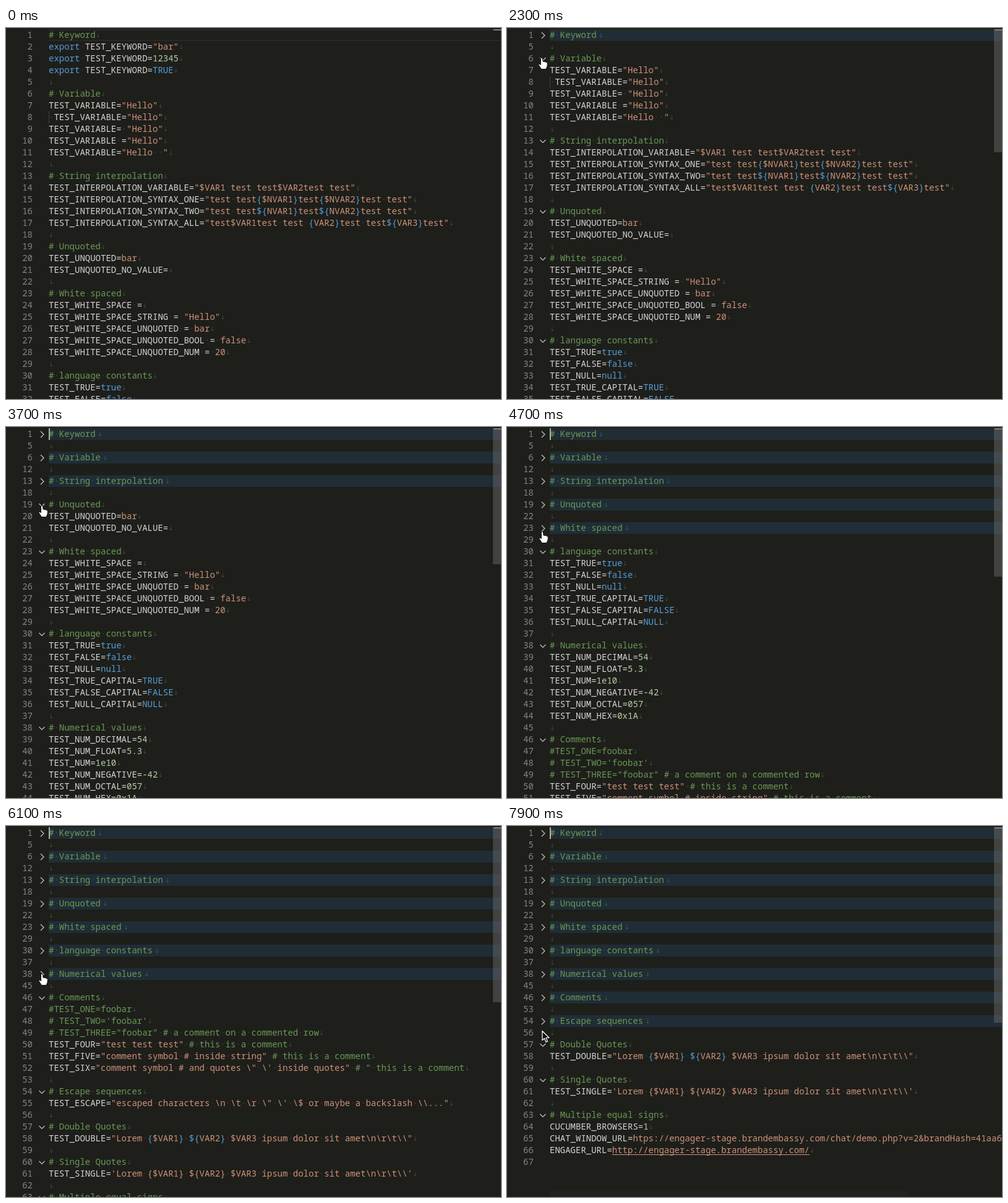
These frames come from a looping animation (800x600 px, 8 s). An HTML page with a canvas:

```html
<!DOCTYPE html>
<html lang="en">
<head>
<meta charset="utf-8">
<title>Folding sections in an env file</title>
<style>
html, body { margin: 0; width: 100%; height: 100%; overflow: hidden; background: #1e1f1b; }
canvas { display: block; }
</style>
</head>
<body>
<canvas id="stage" width="800" height="600"></canvas>
<script type="text/plain" id="code">
# Keyword
export TEST_KEYWORD="bar"
export TEST_KEYWORD=12345
export TEST_KEYWORD=TRUE

# Variable
TEST_VARIABLE="Hello"
 TEST_VARIABLE="Hello"
TEST_VARIABLE= "Hello"
TEST_VARIABLE ="Hello"
TEST_VARIABLE="Hello  "

# String interpolation
TEST_INTERPOLATION_VARIABLE="$VAR1 test test$VAR2test test"
TEST_INTERPOLATION_SYNTAX_ONE="test test{$NVAR1}test{$NVAR2}test test"
TEST_INTERPOLATION_SYNTAX_TWO="test test${NVAR1}test${NVAR2}test test"
TEST_INTERPOLATION_SYNTAX_ALL="test$VAR1test test {VAR2}test test${VAR3}test"

# Unquoted
TEST_UNQUOTED=bar
TEST_UNQUOTED_NO_VALUE=

# White spaced
TEST_WHITE_SPACE =
TEST_WHITE_SPACE_STRING = "Hello"
TEST_WHITE_SPACE_UNQUOTED = bar
TEST_WHITE_SPACE_UNQUOTED_BOOL = false
TEST_WHITE_SPACE_UNQUOTED_NUM = 20

# language constants
TEST_TRUE=true
TEST_FALSE=false
TEST_NULL=null
TEST_TRUE_CAPITAL=TRUE
TEST_FALSE_CAPITAL=FALSE
TEST_NULL_CAPITAL=NULL

# Numerical values
TEST_NUM_DECIMAL=54
TEST_NUM_FLOAT=5.3
TEST_NUM=1e10
TEST_NUM_NEGATIVE=-42
TEST_NUM_OCTAL=057
TEST_NUM_HEX=0x1A

# Comments
#TEST_ONE=foobar
# TEST_TWO='foobar'
# TEST_THREE="foobar" # a comment on a commented row
TEST_FOUR="test test test" # this is a comment
TEST_FIVE="comment symbol # inside string" # this is a comment
TEST_SIX="comment symbol # and quotes \" \' inside quotes" # " this is a comment

# Escape sequences
TEST_ESCAPE="escaped characters \n \t \r \" \' \$ or maybe a backslash \\..."

# Double Quotes
TEST_DOUBLE="Lorem {$VAR1} ${VAR2} $VAR3 ipsum dolor sit amet\n\r\t\\"

# Single Quotes
TEST_SINGLE='Lorem {$VAR1} ${VAR2} $VAR3 ipsum dolor sit amet\n\r\t\\'

# Multiple equal signs
CUCUMBER_BROWSERS=1
CHAT_WINDOW_URL=htps://engager-stage.brandembassy.com/chat/demo.php?v=2&brandHash=41aa6
ENGAGER_URL=http://engager-stage.brandembassy.com/
</script>
<script>
const ctx = document.getElementById("stage").getContext("2d");
const LOOP = 8000, TOP = 2, ROW = 19, LEFT = 69, CHAR = 8.4, VIEW = 598;
const COLOR = {
  back: "#1e1f1b", plain: "#d4d4d4", comment: "#6a9955", keyword: "#569cd6",
  string: "#ce9178", number: "#b5cea8", lineNumber: "#858585",
  faint: "rgba(227,228,226,.16)", fold: "#202d36", border: "#292a27"
};

// Moments at which the screen refreshes: [first, last] in 100 ms steps.
const REFRESH = [
  [0, 0], [800, 1300], [1500, 1500], [1700, 1700], [1900, 1900], [2100, 2100],
  [2300, 2300], [2600, 2900], [3300, 3700], [4000, 4000], [4200, 4300],
  [4700, 5000], [5200, 5200], [5400, 5400], [5600, 5700], [5900, 5900],
  [6100, 6400], [6600, 6700], [6900, 7400], [7600, 7900]
];
const FOLD_TIMES = [1900, 2600, 3300, 4000, 4700, 5400, 6100, 6900, 7600];
// Pointer hotspot: [time, x, y]
const PATH = [
  [800, 3, 38], [1300, 59, 10], [1800, 59, 10], [1900, 60, 25], [2100, 54, 36],
  [2300, 56, 49], [2600, 56, 49], [2900, 55, 88], [3300, 55, 88], [3700, 58, 128],
  [4100, 58, 128], [4300, 58, 162], [4600, 58, 162], [4700, 57, 170],
  [5000, 58, 200], [5500, 58, 200], [5700, 58, 231], [5900, 58, 240],
  [6100, 58, 240], [6400, 54, 274], [6700, 57, 286], [6900, 57, 287],
  [7400, 57, 315], [7600, 57, 316], [7900, 57, 331]
];

const clamp = v => Math.max(0, Math.min(1, v));

function tokenize(text) {
  if (text.startsWith("#")) return [[text, "comment"]];
  const parts = text.match(/^(export)?([^=]*=\s*)("(?:\\.|[^"])*"|'(?:\\.|[^'])*'|[^#\s]*)(.*)$/);
  if (!parts) return [];
  const [, keyword = "", name, value, rest] = parts;
  const spaced = name.endsWith(" ");
  let tokens;
  if (value.startsWith('"')) {
    tokens = value.split(/(\$?\{|\})/).map((s, i) => [s, i % 2 ? "keyword" : "string"]);
  } else if (!spaced && /^-?\d[\w.]*$/.test(value)) {
    tokens = [[value, "number"]];
  } else if (!spaced && /^(true|false|null)$/i.test(value)) {
    tokens = [[value, "keyword"]];
  } else {
    tokens = [[value, "string", value.startsWith("http:")]];
  }
  return [[keyword, "keyword"], [name, "plain"], ...tokens, [rest, "comment"]];
}

const source = document.getElementById("code").textContent.trim().split("\n").concat("");
let section = -1;
const lines = source.map((text, i) => {
  const header = text.startsWith("# ") && !source[i - 1];
  if (header) section++;
  return { text, header, section, number: i + 1, last: i === source.length - 1, tokens: tokenize(text) };
});

function snap(time) {
  let shown = 0;
  for (const [first, last] of REFRESH) {
    if (time >= first) shown = Math.min(last, Math.floor(time / 100) * 100);
  }
  return shown;
}

function pointerAt(time) {
  const next = PATH.findIndex(p => p[0] > time);
  if (next < 0) return PATH[PATH.length - 1].slice(1);
  const [t0, x0, y0] = PATH[next - 1], [t1, x1, y1] = PATH[next];
  const k = (time - t0) / (t1 - t0);
  return [x0 + (x1 - x0) * k, y0 + (y1 - y0) * k];
}

function rect(color, x, y, w, h) {
  ctx.fillStyle = color;
  ctx.fillRect(x, y, w, h);
}

function trace(points) {
  ctx.beginPath();
  points.forEach(([x, y]) => ctx.lineTo(x, y));
}

function strokeLine(color, width, points) {
  trace(points);
  ctx.strokeStyle = color;
  ctx.lineWidth = width;
  ctx.stroke();
}

function drawText(text, x, y, color) {
  ctx.fillStyle = color;
  ctx.fillText(text, x, y);
}

function drawLineEnd(x, y) {
  strokeLine(COLOR.faint, 1, [[x, y - 3], [x, y + 4]]);
  strokeLine(COLOR.faint, 1, [[x - 2, y + 1.5], [x, y + 4], [x + 2, y + 1.5]]);
}

function drawChevron(y, folded, alpha) {
  ctx.globalAlpha = folded ? 1 : alpha;
  strokeLine("#c5c5c5", 1.2, folded
    ? [[56, y - 4], [61, y + 1], [56, y + 6]]
    : [[53.5, y - 1], [58, y + 3.5], [62.5, y - 1]]);
  ctx.globalAlpha = 1;
}

function drawLine(line, top, folded, chevronAlpha) {
  const base = top + 14, middle = top + 9;
  if (folded) rect(COLOR.fold, LEFT, top, 800 - LEFT, ROW);
  if (line.number === 1) {
    rect(COLOR.border, LEFT, top, 800 - LEFT, 2);
    rect(COLOR.border, LEFT, top + ROW - 2, 800 - LEFT, 2);
  }
  const label = String(line.number);
  drawText(label, 43 - label.length * CHAR, base, COLOR.lineNumber);
  if (line.header) drawChevron(middle, folded, chevronAlpha);
  if (line.text.startsWith(" ")) rect("#404040", LEFT, top, 1, ROW);

  let x = LEFT;
  for (const [text, kind, link] of line.tokens) {
    drawText(text, x, base, COLOR[kind]);
    if (link) rect(COLOR[kind], x, base + 2, text.length * CHAR, 1);
    x += text.length * CHAR;
  }
  [...line.text].forEach((c, i) => {
    if (c === " ") drawText("·", LEFT + i * CHAR, base, COLOR.faint);
  });
  if (!line.last) drawLineEnd(x + 4.2 + (folded ? 3 : 0), middle);
}

function drawPointer(x, y, hand) {
  ctx.save();
  ctx.translate(x, y);
  ctx.lineJoin = "round";
  if (hand) {
    trace([[-1.5, 0], [0, -1], [1.5, 0], [2, 5], [5, 5.5], [8, 6.5], [9.5, 8],
      [9, 13], [7, 17.5], [-0.5, 17.5], [-3, 13.5], [-5, 10.5], [-4, 9], [-1.5, 10.5]]);
  } else {
    trace([[0, 0.5], [0, 15.5], [3.5, 12.5], [6, 18.5], [8.5, 17.5], [6, 11.5], [11, 11.5]]);
  }
  ctx.closePath();
  ctx.fillStyle = hand ? "#fff" : "#111";
  ctx.strokeStyle = hand ? "#111" : "#fff";
  ctx.lineWidth = hand ? 1 : 1.2;
  ctx.fill();
  ctx.stroke();
  ctx.restore();
}

function draw(time) {
  const isFolded = line => time >= FOLD_TIMES[line.section];
  const endsSection = line => !line.text;
  const visible = lines.filter(l => l.header || endsSection(l) || !isFolded(l));

  rect(COLOR.back, 0, 0, 800, 600);
  ctx.font = '14px "Noto Sans Mono", monospace';
  const chevronAlpha = clamp((time - 900) / 500);
  visible.forEach((line, i) => {
    const top = TOP + i * ROW;
    if (top < 600) drawLine(line, top, line.header && isFolded(line), chevronAlpha);
  });

  if (time >= 800 && (time + 300) % 1000 < 500) rect("#aeafad", LEFT, TOP, 2, ROW);

  rect("#868684", 788, TOP, 12, 2);
  if (time < 800) return;
  const thumb = VIEW * VIEW / ((visible.length - 1) * ROW + VIEW);
  ctx.globalAlpha = clamp((time - 700) / 200);
  rect("rgba(121,121,121,.4)", 787, TOP, 13, Math.round(thumb));
  ctx.globalAlpha = 1;
  if (time >= 7900) rect("rgba(121,121,121,.05)", LEFT, 590, 579, 10);

  const [x, y] = pointerAt(time);
  const under = visible[Math.floor((y - TOP) / ROW)];
  drawPointer(x, y, x >= 52 && x <= 64 && under.header);
}

function tick() {
  draw(snap(performance.now() % LOOP));
  requestAnimationFrame(tick);
}
tick();
</script>
</body>
</html>
```
